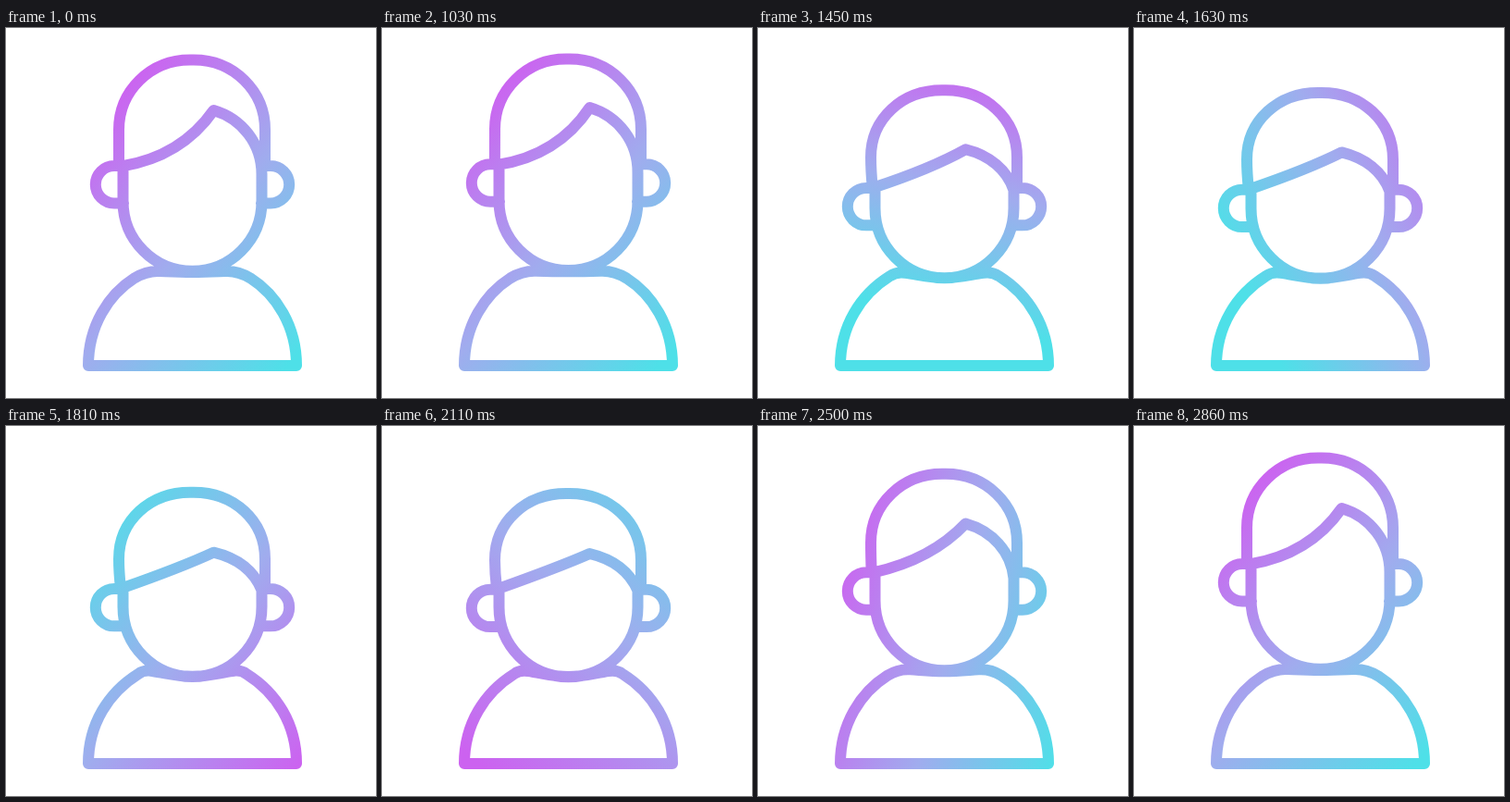
An HTML page with a canvas for the animation above (2890 ms loop, 400x400 px).

```html
<!DOCTYPE html>
<html>
<head>
<meta charset="utf-8">
<style>
  html, body { margin: 0; width: 100%; height: 100%; overflow: hidden; background: #fff; }
  canvas { display: block; width: 400px; height: 400px; }
</style>
</head>
<body>
<canvas id="stage" width="400" height="400"></canvas>
<script>
const ctx = document.getElementById('stage').getContext('2d');
const LOOP = 2890, HOLD = 1030, STEP = 30;
const mix = (a, b, p) => a + (b - a) * p;

// Smooth monotone curve through [time, value] keys, flat at both ends.
function track(...keys) {
  const n = keys.length - 1;
  const slope = i => (keys[i + 1][1] - keys[i][1]) / (keys[i + 1][0] - keys[i][0]);
  const tan = keys.map((k, i) => {
    if (i === 0 || i === n) return 0;
    const a = slope(i - 1), b = slope(i);
    return a * b <= 0 ? 0 : 2 * a * b / (a + b);
  });
  return t => {
    if (t <= keys[0][0]) return keys[0][1];
    if (t >= keys[n][0]) return keys[n][1];
    let i = 0;
    while (t > keys[i + 1][0]) i++;
    const [t0, v0] = keys[i], [t1, v1] = keys[i + 1];
    const h = t1 - t0, u = (t - t0) / h, w = 1 - u;
    return v0 * (1 + 2 * u) * w * w + tan[i] * h * u * w * w
         + v1 * u * u * (3 - 2 * u) - tan[i + 1] * h * u * u * w;
  };
}

// 0 is upright, 1 is ducked: wind up, drop, sink slowly, spring back.
const duck = track([1000, 0], [1090, -.09], [1420, .84], [2110, 1], [2320, 1], [2680, -.1], [2860, 0]);

// The gradient makes one turn (degrees) while its length breathes.
const turn = track([1000, 42], [1450, 103], [2110, 312], [2860, 402]);
const span = track([1000, 336], [1450, 280], [2110, 410], [2500, 290], [2860, 336]);
const share = t => .44 + .2 * Math.exp(-(((t - 1590) / 320) ** 2));

function paint(t) {
  const a = turn(t) * Math.PI / 180, c = share(t), len = span(t);
  const at = d => [200 + Math.cos(a) * d, 200 + Math.sin(a) * d];
  const g = ctx.createLinearGradient(...at(-c * len), ...at((1 - c) * len));
  g.addColorStop(0, 'rgb(204,98,240)');
  g.addColorStop(.5, 'rgb(160,172,238)');
  g.addColorStop(1, 'rgb(78,224,232)');
  return g;
}

function hair(top, root, p) {
  const temple = top + mix(75.5, 72, p);
  return `M${122 + 2 * p} ${root} Q122 ${temple + 14} 122 ${temple}
    C122 ${temple - 42} 156 ${top} 199 ${top} H203
    C246 ${top} 280 ${temple - 42} 280 ${temple} V${root}`;
}

function face(nose, root, jaw, p) {
  const cheek = jaw - 75.5;
  return `M125 ${root + .5}
    C${mix(165, 160, p)} ${root - mix(6, 12, p)} ${mix(200, 195, p)} ${nose + mix(35, 13, p)} 224.5 ${nose}
    C${mix(255, 250, p)} ${nose + mix(9, 6, p)} ${mix(276.5, 268, p)} ${nose + mix(36, 20, p)} 276.5 ${nose + mix(69, 40, p)}
    V${cheek} C276.5 ${cheek + 42} 243 ${jaw} 201.5 ${jaw}
    S126.5 ${cheek + 42} 126.5 ${cheek} V${root}`;
}

function ears(y) {
  const r = 20.2, low = y + 2 * r;
  return `M124 ${y} H117 A${r} ${r} 0 0 0 117 ${low} H127
    M279 ${y} H286 A${r} ${r} 0 0 1 286 ${low} H276`;
}

// Left half from hem to neck, then the same points mirrored back.
function body(q) {
  const half = [
    [89, 365], [89, 322], [111, 288], [mix(139, 143, q), mix(270.3, 268, q)],
    [mix(149, 148, q), 264.3], [mix(157, 152, q), mix(262.5, 264, q)], [mix(166, 158, q), mix(263, 265, q)],
    [mix(178, 172, q), mix(263.5, 267, q)], [186, mix(264, 271, q)], [201.5, mix(264, 271, q)]
  ];
  const back = half.slice(0, -1).reverse().map(([x, y]) => [403 - x, y]);
  const [first, ...rest] = [...half, ...back];
  return `M${first} C${rest.join(' ')} Z`;
}

// The jaw leads the face, and the face leads the crown.
function figure(t) {
  const late = duck(t), p = duck(t + 25), q = duck(t + 60);
  const ear = 149 + 27.7 * p, root = ear - p;
  return new Path2D([
    hair(34.5 + 38.5 * late, root, p),
    face(89 + 49 * p, root, 262.7 + 8.5 * q, p),
    ears(ear),
    body(q)
  ].join(' '));
}

function draw(now) {
  let t = now % LOOP;
  t = t < HOLD ? 0 : HOLD + Math.floor((t - HOLD) / STEP) * STEP;
  ctx.fillStyle = '#fff';
  ctx.fillRect(0, 0, 400, 400);
  ctx.lineWidth = 12;
  ctx.lineCap = ctx.lineJoin = 'round';
  ctx.strokeStyle = paint(t);
  ctx.stroke(figure(t));
}

const start = performance.now();
function tick() {
  draw(performance.now() - start);
  requestAnimationFrame(tick);
}
tick();
</script>
</body>
</html>
```
